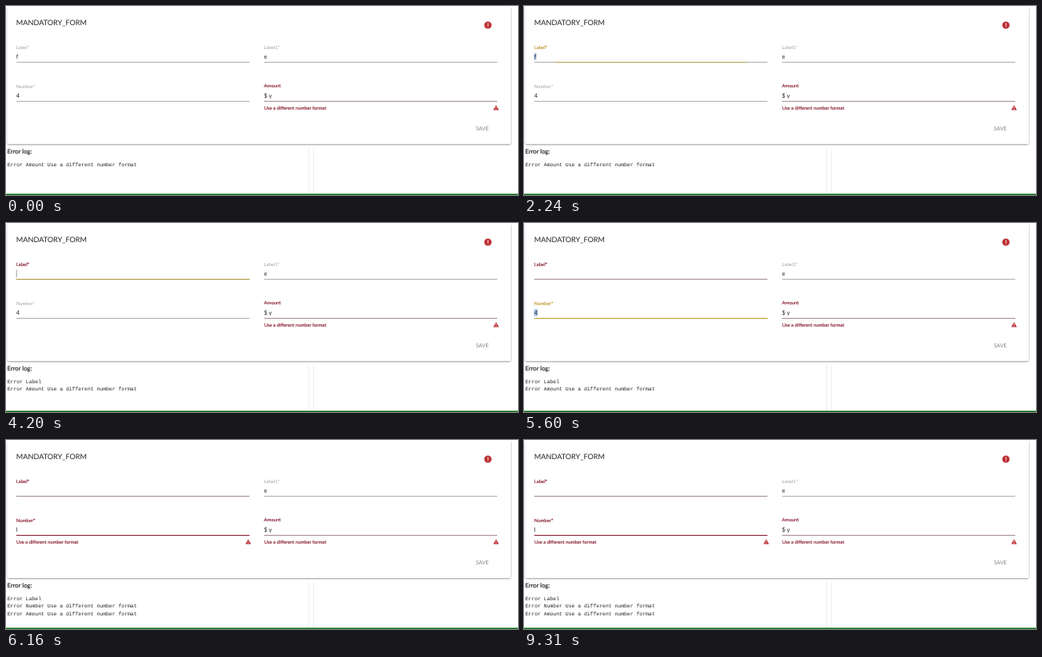
Write an HTML page that moves like this. It is 640 px wide and 237 px high and loops after 9590 ms.

```html
<!DOCTYPE html>
<html lang="en">
<head>
<meta charset="utf-8">
<title>Form validation</title>
<style>
  html, body { margin: 0; width: 100%; height: 100%; overflow: hidden; background: #fff; }
  svg { display: block; width: 100vw; height: 100vh; text-rendering: geometricPrecision; }
  text { font-family: Lato, sans-serif; white-space: pre; }
  .strong { stroke: currentColor; stroke-width: .18px; }
  .log { font: 6.43px "Liberation Mono", monospace; }
</style>
</head>
<body>
<svg id="stage" viewBox="0 0 640 237"></svg>
<script>
const LOOP = 9590, STEP = 70;
const INK = '#222', GREY = '#a0a0a0', RULE = '#adadad', ERROR_RULE = '#a08b8f';
const AMBER = [196, 156, 58], RED = [140, 38, 58], ALERT = '#bd3237';
const FORMAT_ERROR = 'Use a different number format';

const clamp = v => Math.max(0, Math.min(1, v));
const rgb = c => `rgb(${c.map(Math.round)})`;
const mix = (a, b, k) => a.map((v, i) => v + (b[i] - v) * k);
const during = (t, from, to) => t >= from && t < to;

// cubic-bezier(.25, .8, .25, 1)
function easeOut(x) {
  let lo = 0, hi = 1;
  for (let i = 0; i < 20; i++) {
    const s = (lo + hi) / 2, r = 1 - s;
    if (.75 * r * s + s ** 3 < x) lo = s; else hi = s;
  }
  const r = 1 - lo;
  return 2.4 * r * r * lo + 3 * r * lo * lo + lo ** 3;
}

const text = (x, y, size, fill, str, extra = '') =>
  `<text x="${x}" y="${y}" font-size="${size}" fill="${fill}" color="${fill}" ${extra}>${str}</text>`;
const strongText = (...args) => text(...args, 'class="strong"');
const rect = (x, y, w, h, fill, extra = '') =>
  `<rect x="${x}" y="${y}" width="${w}" height="${h}" fill="${fill}" ${extra}/>`;

function field({ x, y, label, labelColor = GREY, labelY = y - 16.5, value, prefix = '', prefixColor = INK,
                 rule = RULE, focus = 0, focusColor = rgb(AMBER), selected = 0, caret = null }) {
  const width = 291.5, scale = .5 + .5 * easeOut(clamp(focus));
  const drawLabel = labelColor === GREY ? text : strongText;
  let out = drawLabel(x, labelY, 5.9, labelColor, label) + rect(x, y, width, 1, rule);
  if (focus > 0) {
    out += rect(x + width * (1 - scale) / 2, y, width * scale, 1.15, focusColor, `opacity="${clamp(focus * 3)}"`);
  }
  if (selected) out += rect(x - .3, y - 10.9, selected, 8.8, '#a9c6ea');
  if (prefix) out += text(x, y - 3.6, 7.4, prefixColor, prefix);
  out += text(x + (prefix ? 6 : 0), y - 3.6, 7.4, INK, value);
  if (caret !== null) out += rect(x + caret, y - 11.2, .6, 9.5, '#555');
  return out;
}

function formatError(x, shown) {
  const cx = x + 290;
  return `<g opacity="${shown}" transform="translate(0 ${-4 * (1 - shown)})">` +
    strongText(x + .2, 129.6, 5.85, rgb(RED), FORMAT_ERROR) +
    `<path d="M${cx} 124.3l3.5 6.2h-7z" fill="${ALERT}"/>` +
    rect(cx - .35, 126.4, .7, 2, '#fff') + rect(cx - .35, 129, .7, .7, '#fff') + '</g>';
}

const frame = `
  <defs><filter id="shadow" x="-5%" y="-5%" width="110%" height="115%">
    <feDropShadow dx="0" dy="1" stdDeviation="1" flood-opacity=".4"/></filter></defs>
  ${rect(1.5, .5, 629.5, 172.5, '#fff', 'rx="2.5" filter="url(#shadow)"')}
  ${text(12.8, 24.4, 9.15, INK, 'MANDATORY_FORM')}
  <circle cx="602.4" cy="24" r="4.6" fill="${ALERT}"/>
  ${rect(602, 21.5, .9, 3.1, '#fff')}${rect(602, 25.5, .9, .9, '#fff')}
  ${text(587.2, 155.9, 6.8, '#858585', 'SAVE')}
  ${strongText(1.6, 185.2, 7.7, INK, 'Error log:')}
  ${rect(378, 178, 1, 58, '#efefef')}${rect(384, 178, 1, 58, '#efefef')}
  ${rect(0, 235.5, 640, 1.5, '#066a0c')}`;

function draw(t) {
  const cleared = t >= 3150, typed = t >= 5670;
  const focusFrom = (start, end) => t < end ? (t - start) / 300 : 0;
  const amountFocused = during(t, 1820, 2240);
  const labelFocused = during(t, 2240, 4410);
  const numberColor = rgb(mix(AMBER, RED, clamp((t - 5600) / 400)));

  const log = ['Error Amount ' + FORMAT_ERROR];
  if (typed) log.unshift('Error Number ' + FORMAT_ERROR);
  if (cleared) log.unshift('Error Label');

  return frame +
    field({
      x: 12.8, y: 70, label: 'Label*', value: cleared ? '' : 'f',
      labelColor: cleared ? rgb(RED) : labelFocused ? rgb(AMBER) : GREY,
      rule: cleared ? ERROR_RULE : RULE,
      focus: focusFrom(2175, 4410),
      focusColor: cleared ? '#b39b43' : rgb(AMBER),
      selected: during(t, 2240, 3150) ? 3 : 0,
      caret: during(t, 3150, 3640) || during(t, 4200, 4410) ? 0 : null
    }) +
    field({ x: 322.6, y: 70, label: 'Label1*', value: 'e' }) +
    field({
      x: 12.8, y: 119, label: 'Number*', value: typed ? 'l' : '4',
      labelColor: t >= 4410 ? numberColor : GREY,
      focus: focusFrom(4345, LOOP), focusColor: numberColor,
      selected: during(t, 4410, 5670) ? 4.8 : 0,
      caret: during(t, 5670, 6160) || during(t, 6720, 7210) ||
             during(t, 7770, 8260) || during(t, 8820, 9310) ? 2 : null
    }) +
    field({
      x: 322.6, y: 119, label: 'Amount', labelY: 101.9, value: 'y', prefix: '$',
      labelColor: rgb(RED), rule: ERROR_RULE,
      prefixColor: amountFocused ? rgb(AMBER) : INK,
      focus: focusFrom(1754, 2240),
      caret: amountFocused ? 10.2 : null
    }) +
    formatError(322.6, 1) +
    (typed ? formatError(12.8, clamp((t - 5670) / 300)) : '') +
    log.map((line, i) => `<text class="log" x="1.7" y="${201 + i * 9.3}" fill="${INK}">${line}</text>`).join('');
}

const stage = document.getElementById('stage');
let shown = -1;
function tick() {
  const t = Math.floor(performance.now() % LOOP / STEP) * STEP;
  if (t !== shown) stage.innerHTML = draw(shown = t);
  requestAnimationFrame(tick);
}
tick();
</script>
</body>
</html>
```
